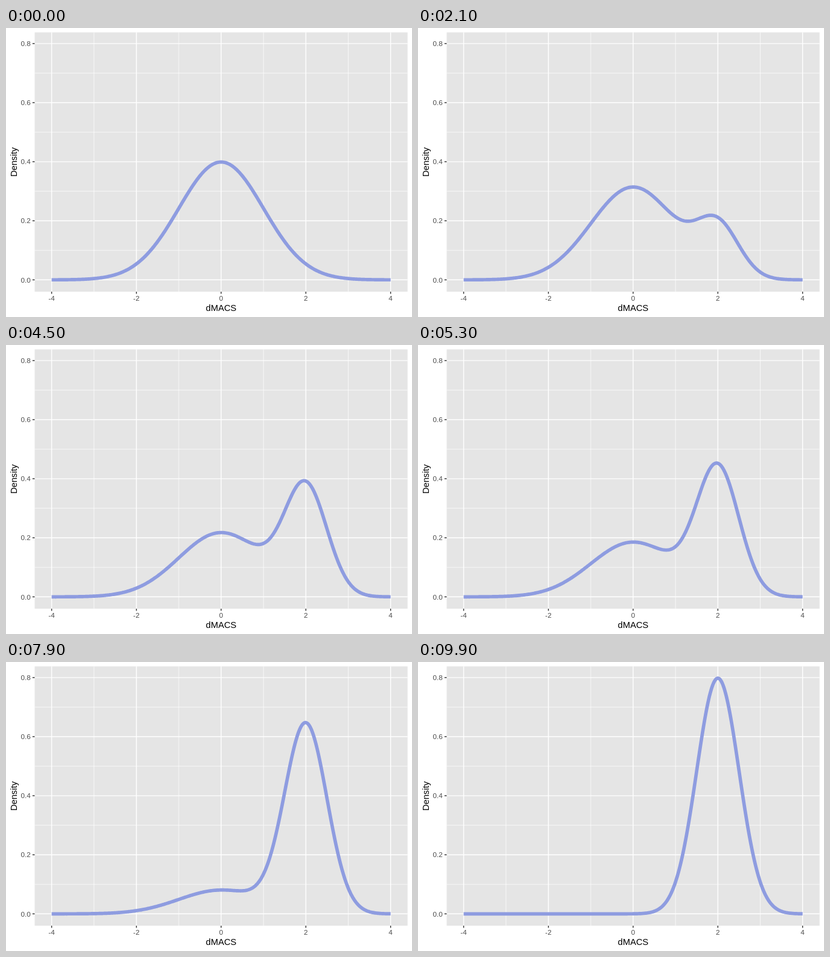
Animation of 672 by 480 pixels, one loop 10 s. Source, as an HTML page:

```html
<!DOCTYPE html>
<html lang="en">
<head>
<meta charset="utf-8">
<title>Density mixture</title>
<style>
  html, body { margin: 0; width: 100%; height: 100%; overflow: hidden; background: #fff; }
  svg { display: block; }
  text { font-family: "Liberation Sans", Arial, sans-serif; text-anchor: middle; }
  .label { font-size: 11.73px; fill: #4d4d4d; }
  .end { text-anchor: end; }
  .title { font-size: 14.67px; fill: #000; }
  .major { stroke: #fff; stroke-width: 1.42; }
  .minor { stroke: #fff; stroke-width: 0.71; }
  .tick { stroke: #333; stroke-width: 1.42; }
  #curve { fill: none; stroke: #8e9ce0; stroke-width: 5.69; stroke-linejoin: round; }
</style>
</head>
<body>
<svg id="plot" width="672" height="480" viewBox="0 0 672 480"></svg>
<script>
const svg = document.getElementById('plot');
const panel = { left: 47.5, top: 7.33, right: 664.67, bottom: 437.9 };
const FRAMES = 100, FRAME_MS = 100;

const px = x => 356.08 + 70.13 * x;
const py = y => 418.33 - 490.6 * y;

function add(tag, attrs, content = '') {
  const node = document.createElementNS('http://www.w3.org/2000/svg', tag);
  for (const key in attrs) node.setAttribute(key, attrs[key]);
  node.textContent = content;
  svg.append(node);
  return node;
}
const line = (cls, x1, y1, x2, y2) => add('line', { class: cls, x1, y1, x2, y2 });
const vertical = (cls, x) => line(cls, px(x), panel.top, px(x), panel.bottom);
const horizontal = (cls, y) => line(cls, panel.left, py(y), panel.right, py(y));

add('rect', {
  x: panel.left, y: panel.top, fill: '#e5e5e5',
  width: panel.right - panel.left, height: panel.bottom - panel.top
});
[-3, -1, 1, 3].forEach(x => vertical('minor', x));
[0.1, 0.3, 0.5, 0.7].forEach(y => horizontal('minor', y));

const xBreaks = [-4, -2, 0, 2, 4], yBreaks = [0, 0.2, 0.4, 0.6, 0.8];
xBreaks.forEach(x => vertical('major', x));
yBreaks.forEach(y => horizontal('major', y));
const curve = add('path', { id: 'curve' });

xBreaks.forEach(x => {
  line('tick', px(x), panel.bottom, px(x), panel.bottom + 3.67);
  add('text', { class: 'label', x: px(x), y: 452.9 }, x);
});
yBreaks.forEach(y => {
  line('tick', panel.left - 3.67, py(y), panel.left, py(y));
  add('text', { class: 'label end', x: 40.9, y: py(y) + 4.2 }, y.toFixed(1));
});
add('text', { class: 'title', x: 356.08, y: 469.7 }, 'dMACS');
add('text', { class: 'title', transform: 'translate(17.8 222.6) rotate(-90)' }, 'Density');

const normal = (x, mean, sd) =>
  Math.exp(-(((x - mean) / sd) ** 2) / 2) / (sd * Math.sqrt(2 * Math.PI));

// The weight moves steadily from N(0, 1) to N(2, 0.5).
function draw(ms) {
  const weight = Math.floor(ms / FRAME_MS) % FRAMES / (FRAMES - 1);
  const points = [];
  for (let i = 0; i <= 400; i++) {
    const x = -4 + i / 50;
    const y = (1 - weight) * normal(x, 0, 1) + weight * normal(x, 2, 0.5);
    points.push(px(x).toFixed(2) + ',' + py(y).toFixed(2));
  }
  curve.setAttribute('d', 'M' + points.join('L'));
}

const start = performance.now();
function tick() {
  draw(performance.now() - start);
  requestAnimationFrame(tick);
}
tick();
</script>
</body>
</html>
```
